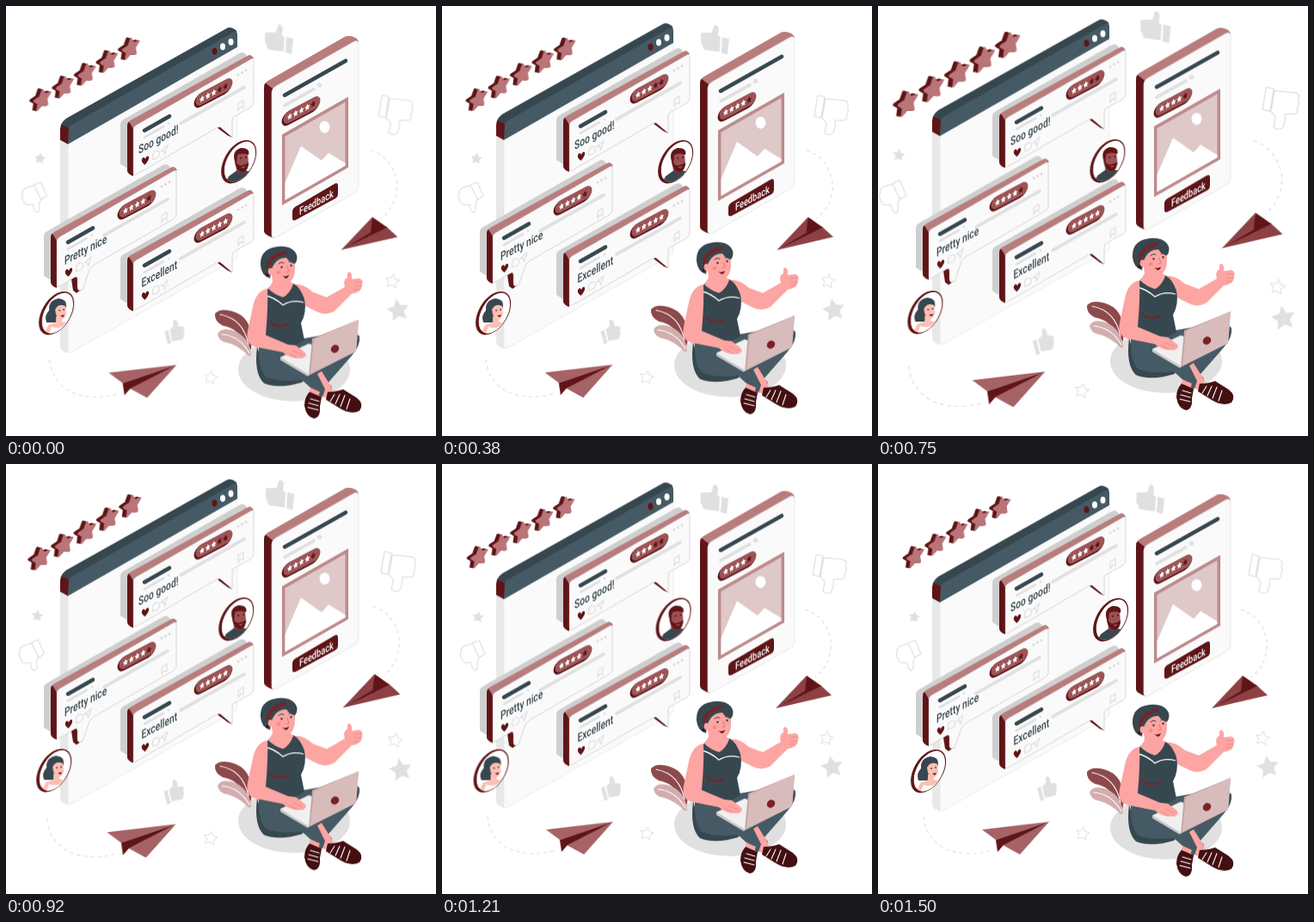
An HTML page without scripts for the animation above (1540 ms loop, 500 by 500 pixels).

```html
<!DOCTYPE html>
<html lang="en">
<head>
<meta charset="utf-8">
<title>Feedback</title>
<style>
  html, body { margin: 0; height: 100%; overflow: hidden; background: #fff; }
  svg { display: block; width: 100vw; height: 100vh; }
  text { font: 500 12.5px Roboto, sans-serif; fill: #37474f; }
  .button { font-size: 11.5px; fill: #fff; }
  .float, .beat, .drift { animation: float 1540ms linear -27ms infinite; }
  .beat { animation-name: beat; }
  .drift { animation-name: drift; }
  .icons { transform-origin: 246px 229px; }
  .planes { transform-origin: 252px 311px; }
  .rating { transform-origin: 91.5px 79px; }
  @keyframes float { 50% { transform: translateY(-10px); } }
  @keyframes beat {
    0%, 28%, 37%, 66%, 100% { transform: scale(1); }
    14%, 51% { transform: scale(1.09); }
  }
  @keyframes drift {
    0%, 100% { transform: none; }
    47% { transform: translateX(1.8px); }
    50% { transform: translate(-3.7px, -1px); }
  }
  .dark { fill: #5f1517; }
  .shoe { fill: #430f11; }
  .mid { fill: #9c5456; }
  .pink { fill: #b97c7d; }
  .slate { fill: #37474f; }
  .denim { fill: #455a64; }
  .skin { fill: #fca5a3; }
  .paper { fill: #fafafa; }
  .white { fill: #fff; }
  .grey { fill: #e0e0e0; }
  .line { fill: none; stroke: #e0e0e0; stroke-width: 1.2; stroke-linejoin: round; }
  .bar { fill: none; stroke: #e0e0e0; stroke-width: 3.6; stroke-linecap: round; }
  .thin { stroke-width: 2.8; }
  .ink { stroke: #37474f; stroke-width: 4.6; }
  .edge { stroke: #b5a3a3; stroke-width: .6; stroke-dasharray: 1.5 .6; }
  .lace { fill: none; stroke: #fff; stroke-width: 1.1; stroke-linecap: round; }
</style>
</head>
<body>
<svg viewBox="0 0 500 500">
  <defs>
    <path id="star" stroke-linejoin="round" d="M0-10 2.9-4 9.5-3.1 4.8 1.5 5.9 8.1 0 5-5.9 8.1-4.8 1.5-9.5-3.1-2.9-4Z"/>
    <g id="solidStar" transform="matrix(.95 -.5 0 1.08 0 0)">
      <g class="dark" stroke="#5f1517" stroke-width="2.4">
        <use href="#star" x="-3.4" y="-2"/><use href="#star" x="-2" y="-1.2"/><use href="#star" x="-.4"/>
      </g>
      <use href="#star" x="1.4" y=".8" fill="#b97578" stroke="#b97578" stroke-width="2.4"/>
    </g>
    <g id="pill" transform="skewY(-28)">
      <rect class="dark" x="-22.5" y="-7" width="44" height="16" rx="8"/>
      <rect class="mid" x="-20.5" y="-7.5" width="43" height="14.5" rx="7.2"/>
    </g>
    <use id="tiny" href="#star" transform="scale(.32 .4)"/>
    <g id="three" class="white" transform="skewY(-28)">
      <use href="#tiny" x="-13"/><use href="#tiny" x="-6.2"/><use href="#tiny" x=".6"/>
    </g>
    <use id="four" href="#tiny" transform="skewY(-28) translate(7.4)"/>
    <use id="five" href="#tiny" transform="skewY(-28) translate(14.2)"/>

    <g id="cardBack">
      <path fill="#cfcfcf" d="M133 138Q133 134 137 132L272 55Q277 53 280 58V110L141 189 133 184Z"/>
      <path class="pink" d="M141 138Q142 135 145 133L281 58Q285 56 288 61L148 142Z"/>
      <path class="dark" d="M143 135Q141 136 141 140V192Q142 196 148 198V143Z"/>
    </g>
    <g id="cardBody">
      <path class="bar ink" d="M161 145 190 128.500"/>
      <path class="bar thin" d="M161 153 183 140.500M189 137v0"/>
      <path class="bar" d="M203 137 277 95"/>
      <g fill="#dcdcdc"><circle cx="270" cy="80" r="1.500"/><circle cx="274.500" cy="77.500" r="1.500"/><circle cx="279" cy="75" r="1.500"/></g>
      <path class="line" d="M270 114 276 110V119L273 117.500 270 122Z"/>
      <path class="dark" d="M161.500 185Q156 181 158.500 177.500 160.500 175 162 178 164 173.500 166 175.500 167 179 161.500 185Z"/>
      <path class="line" d="M170.500 176Q170 171 174.500 169 179 168 178.500 173 177 178 173 178L170.500 179ZM180 169 188 162 184.500 173 183.500 168.500Z"/>
      <use href="#pill" x="241" y="101"/>
    </g>
    <g id="bubble">
      <use href="#cardBack"/>
      <path class="dark" d="M246 142 258 151 263 153 262 135Z"/>
      <path class="paper edge" d="M148 145Q148 141 151 139L284 62.500Q288 60 288 65V112Q288 116 284 118.500L265 129Q263 130 263 134V153L250 142Q248 140 245 142L152 196Q148 198 148 194Z"/>
      <use href="#cardBody"/>
    </g>
    <g id="bubbleLeft">
      <use href="#cardBack"/>
      <path class="dark" d="M165 188 167 201 171 204 178 199 172 184Z"/>
      <path class="paper edge" d="M148 145Q148 141 151 139L283 62.500Q287 60 287 65V112Q287 116 283 118.500L192 171Q188 173 186 177L178 200Q172 203 172 197V188Q172 184 168 186L152 196Q148 198 148 194Z"/>
      <use href="#cardBody"/>
    </g>
    <clipPath id="disc"><circle cx="1" cy=".5" r="21" transform="matrix(.87 -.5 0 1 0 0)"/></clipPath>
    <g id="ring" transform="matrix(.87 -.5 0 1 0 0)">
      <circle class="dark" cx="-1.500" cy="-.5" r="22.500"/>
      <circle class="white" cx="1" cy=".5" r="21.500" stroke="#5f1517" stroke-width="1.200"/>
    </g>
  </defs>

  <g class="beat icons">
    <path class="grey" d="M323 38 320 36 321 28Q320 24 316 24L313 33 302 33Q299 35 301 38 299 41 301 43 300 46 303 48 302 52 306 53L322 55ZM325 38 333 40 331 58 324 56Z"/>
    <path class="grey" d="M191 375 195 371 195 364Q198 362 200 366L201 371 206 371Q209 373 207 376 209 379 207 381 208 384 205 386L194 388ZM185 377 189 375 193 390 189 392Z"/>
    <path class="line" d="M435 105 443 107 439 131 431 129ZM444 109 466 111Q472 113 469 119 472 123 468 127 470 133 465 134L455 134Q456 143 452 149 447 152 443 148L445 137 440 131Z"/>
    <path class="line" d="M35 208 43 205 50 221 43 225ZM35 209 25 212Q21 215 22 219 20 223 23 226 23 230 27 231L34 231Q34 238 39 240 42 239 41 230L43 225"/>
    <use href="#star" class="grey" transform="translate(42 178) rotate(8) scale(.7)"/>
    <use href="#star" class="grey" transform="translate(453.500 352.500) rotate(-10) scale(1.350)"/>
    <use href="#star" class="line" transform="translate(447 319) rotate(10) scale(.83)"/>
    <use href="#star" class="line" transform="translate(238 430) rotate(10) scale(.8)"/>
  </g>

  <g class="beat planes">
    <path class="line" stroke-dasharray="4 4" d="M422 169Q446 177 452 205 454 231 434 248M53 410Q55 434 77 447 103 458 133 449"/>
    <path fill="#8d4144" d="M424 246 388 284 424 264ZM388 284 440 257 453 269Z"/>
    <path class="dark" d="M424 246 441 258 388 284 422 264Z"/>
    <path fill="#a66265" d="M121 425 199 416 137 437ZM199 416 165 454 145 443Z"/>
    <path class="dark" d="M137 437 199 416 146 443 139 451Z"/>
  </g>

  <g class="beat rating"><g class="beat rating">
    <use href="#solidStar" x="42" y="108"/><use href="#solidStar" x="67.500" y="93.500"/>
    <use href="#solidStar" x="92.500" y="79"/><use href="#solidStar" x="117.500" y="64.500"/>
    <use href="#solidStar" x="142.500" y="50"/>
  </g></g>

  <g class="float">
    <!-- browser window -->
    <path fill="#e8e8e8" d="M63 155 72 160V404L66 401Q63 399 63 395Z"/>
    <path class="paper" stroke="#e6e6e6" stroke-width=".7" d="M72 160 269 47V290Q269 294 265 296L76 403Q72 405 72 401Z"/>
    <path class="slate" d="M64 138Q66 134 70 131L257 26Q262 24 268 29L269 34 72 146Z"/>
    <path class="denim" d="M72 144Q73 140 77 138L264 31Q269 29 269 35V48L72 161Z"/>
    <path class="dark" d="M64 138 73 142 72 161 63 156V143Z"/>
    <ellipse class="dark" cx="242.500" cy="53" rx="3" ry="4"/>
    <ellipse class="white" cx="252" cy="47.500" rx="3" ry="4"/><ellipse class="white" cx="261.500" cy="42" rx="3" ry="4"/>

    <use href="#bubble"/>
    <g transform="translate(241 101.500)"><use href="#three"/><use href="#four" class="dark"/><use href="#five" class="dark"/></g>
    <text transform="translate(154 172.500) skewY(-28) scale(.82 1.120)">Soo good!</text>

    <g transform="translate(-89 130)">
      <use href="#bubbleLeft"/>
      <g transform="translate(241 101.500)"><use href="#three"/><use href="#four" class="white"/><use href="#five" class="dark"/></g>
    </g>
    <text transform="translate(68 301.500) skewY(-28) scale(.82 1.120)">Pretty nice</text>

    <g transform="translate(0 157)">
      <use href="#bubble"/>
      <g transform="translate(241 101.500)"><use href="#three"/><use href="#four" class="white"/><use href="#five" class="white"/></g>
    </g>
    <text transform="translate(157.500 327.500) skewY(-28) scale(.82 1.120)">Excellent</text>

    <!-- phone -->
    <path class="pink" d="M300 93Q301 89 305 87L394 36Q399 34 406 37 410 39 410 43L309 99Z"/>
    <path class="dark" d="M302 90Q300 91 300 96V262Q300 266 311 270V97Z"/>
    <path class="paper" stroke="#dedede" stroke-width=".7" d="M309 101Q309 97 313 94L404 42Q410 39 410 45V209Q410 215 405 218L315 269Q309 272 309 266Z"/>
    <path class="bar ink" d="M324 104 395 64"/>
    <path class="bar" d="M324 116 358 97"/><circle class="grey" cx="364.500" cy="92.500" r="2.700"/>
    <g transform="translate(343 122)">
      <use href="#pill"/><use href="#three"/><use href="#four" class="white"/><use href="#five" class="dark"/>
    </g>
    <path fill="#dfc8c8" stroke="#bd8b8c" stroke-width="3.500" d="M322.700 151 396.300 109V187L322.700 229Z"/>
    <path class="white" d="M324.500 206 343 163 367 180 375 171 394.500 183V186L324.500 226Z"/>
    <ellipse class="white" cx="370.500" cy="141" rx="6" ry="7"/>
    <path class="dark" d="M333 239Q333 236 336 234L382 207Q386 205 386 209V219Q386 222 383 224L337 249Q333 251 333 247Z"/>
    <text class="button" transform="translate(341 243.500) skewY(-28) scale(.8 1.080)">Feedback</text>

    <!-- seated woman -->
    <ellipse class="grey" cx="335" cy="423" rx="65" ry="37"/>
    <path fill="#8d494b" d="M285 400Q289 366 268 357 250 350 243 358 242 367 252 372 270 375 278 393Z"/>
    <path fill="#d2aeae" d="M285 407Q283 383 262 377 249 374 246 382 248 391 258 392 270 395 282 407Z"/>
    <path class="lace" d="M249 359Q276 364 282 394M251 382Q272 384 283 404"/>

    <path class="denim" d="M340 388 385 380Q404 377 411 384 413 394 402 407L374 439 360 440 358 420Z"/>
    <path class="slate" d="M292 396Q288 428 300 439 318 446 344 438L352 430 300 424Z"/>
    <path class="denim" d="M294 396Q293 425 303 432 318 438 344 435L366 455 376 452 379 443 354 417 345 390Z"/>
    <path class="skin" d="M362 428 367 425 380 446 374 456 368 455 371 446ZM354 444 365 449 363 455 352 452Z"/>
    <path class="shoe" d="M353 449Q347 455 347 465 349 478 358 480 366 479 365 466L367 455Z"/>
    <path class="shoe" d="M374 449Q384 449 392 446L408 456Q417 463 411 471 401 476 388 468L372 458Z"/>
    <path class="lace" d="M354 457 364 460M352 462 363 465M351 467 363 470M382 452 377 460M388 452 383 463M394 453 389 466M400 457 396 469"/>

    <path class="skin" d="M333 324Q345 322 357 333L373 339 394 327Q391 319 397 316L397 311Q400 307 402 313L402 318 411 317Q416 319 414 325 414 333 402 335L382 355Q373 361 362 356L342 346Z"/>
    <path fill="none" stroke="#e88886" stroke-width=".9" d="M405 322 413 321M405 326 413 326M404 330 411 330"/>
    <path class="slate" d="M304 330Q300 340 303 360L300 394Q321 406 347 389L343 369Q350 357 347 341 342 327 334 323L306 327Z"/>
    <path class="skin" d="M309 312 329 319 334 324Q330 335 322 339 312 336 305 329L310 321Z"/>
    <path fill="none" stroke="#fff" stroke-width="1.300" d="M302 337Q312 339 322 348 333 341 346 345"/>
    <path fill="none" stroke="#7a2225" stroke-width="2" stroke-linecap="round" d="M308 368Q317 376 328 370"/>

    <path class="skin" d="M308 306Q307 288 324 288 336 288 336 303 337 318 327 324 314 324 308 312Z"/>
    <path class="slate" d="M307 317Q297 314 296 302 295 285 311 281 328 277 336 286 341 293 336 300 330 299 326 293 314 293 309 306Z"/>
    <path fill="none" stroke="#7a2225" stroke-width="3.500" d="M305 306Q304 291 326 286"/>
    <ellipse class="skin" cx="307.500" cy="309" rx="2.800" ry="4"/><circle class="shoe" cx="304" cy="313" r="1.800"/>
    <circle class="slate" cx="320.500" cy="304" r="1.300"/><circle class="slate" cx="331.500" cy="302" r="1.300"/>
    <path fill="none" stroke="#37474f" stroke-linecap="round" d="M317 300Q320 297 323 299M329 298 333 297"/>
    <path fill="none" stroke="#e57775" stroke-linecap="round" d="M327 303 329 309 326 310"/>
    <path class="dark" d="M321 314Q325 316 329 313 328 317 325 317Z"/>
    <ellipse cx="317" cy="310" rx="2.500" ry="2" fill="#f58986"/>

    <path fill="#f0f0f0" stroke="#d4d4d4" stroke-width=".7" d="M319 409 352 393 372 401 352 430Z"/>
    <path fill="#c9c9c9" d="M319 409 351 428V431L319 412Z"/>
    <path class="skin" d="M304 329Q291 331 287 350L281 378Q278 395 292 397L322 403Q330 411 344 410 353 407 345 401L337 395 328 394 302 383Q305 350 304 329Z"/>
    <path fill="none" stroke="#e88886" stroke-width=".9" d="M333 401 345 406M329 404 338 409"/>
    <path fill="#c9a5a5" d="M356 387 410 365 407 402 352 430Z"/>
    <path fill="#d8bcbc" d="M358 388 410 365 407 402 354 428Z"/>
    <ellipse cx="382.500" cy="399" rx="5" ry="4.400" transform="rotate(-40 382.500 399)" fill="#7a2225"/>
  </g>

  <g class="drift">
    <g transform="translate(271 181)">
      <use href="#ring"/>
      <g clip-path="url(#disc)">
        <path class="slate" d="M-18 28-12 17-1 9 11 11 22 17V30Z"/>
        <path fill="#7c3538" d="M-4 2H8V11Q3 16-3 11Z"/>
        <path fill="#9c5052" d="M-5-8Q2-15 10-9L11 3Q8 11 3 11-4 9-5 0Z"/>
        <path class="dark" d="M-5 0Q-9-13 2-16 13-16 11-8 4-11-2-8L-3 1Q0 6 4 4 9 3 11 1 11 11 4 12-4 10-5 0Z"/>
        <path fill="#9c5052" d="M2 6 8 5 5 8Z"/>
        <circle class="shoe" cx="2" cy="-4" r=".9"/><circle class="shoe" cx="8" cy="-5" r=".9"/>
      </g>
    </g>
    <g transform="translate(59 357)">
      <use href="#ring"/>
      <g clip-path="url(#disc)">
        <path class="slate" d="M-12 11Q-15 3-9-3-10-15 2-17 12-16 11-8L8 2-2 11Z"/>
        <path fill="#fdbfb3" d="M-16 28-10 14-1 11V4H6V10L16 13 20 26Z"/>
        <path class="white" d="M-11 28-6 16Q4 20 11 12L17 24Z"/>
        <path fill="#fdbfb3" d="M-2-4Q2-12 10-8L11 1Q9 8 4 8-1 6-2-4Z"/>
        <path class="dark" d="M4 3 9 2 7 5Z"/>
        <circle class="slate" cx="3" cy="-3" r=".9"/><circle class="slate" cx="8" cy="-4" r=".9"/>
      </g>
    </g>
  </g>
</svg>
</body>
</html>
```
